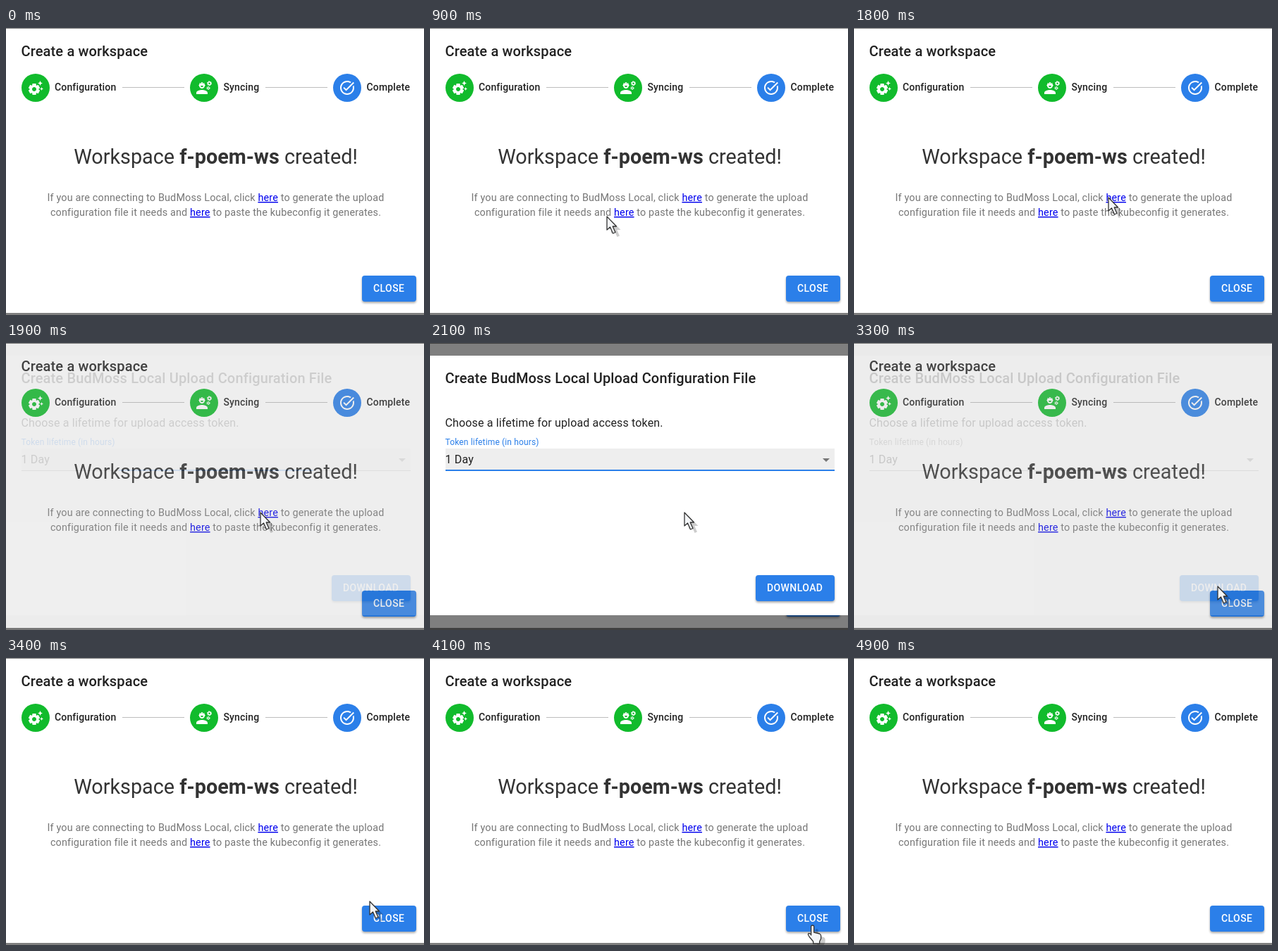
Animation, 593 px wide and 408 px high, one loop 6100 ms. Source, as an HTML page:

```html
<!DOCTYPE html>
<html lang="en">
<head>
<meta charset="utf-8">
<title>Create a workspace</title>
<style>
  html, body { margin: 0; width: 100%; height: 100%; overflow: hidden; background: #fff; }
  svg { display: block; width: 593px; height: 408px; }
  text { font: 400 14px Roboto, Arial, sans-serif; letter-spacing: .15px; fill: #212121; white-space: pre; }
  .title { font-size: 20px; font-weight: 500; }
  .step { font-weight: 500; }
  .headline { font-size: 28.8px; letter-spacing: 0; fill: #333; text-anchor: middle; }
  .headline tspan { font-weight: 700; }
  .note { font-size: 14.4px; fill: #777; text-anchor: middle; }
  .note tspan { fill: #00e; text-decoration: underline; }
  .body { font-size: 16px; }
  .label { font-size: 12px; }
  .button { fill: #2b7fe9; filter: drop-shadow(0 2px 1.5px #0005); }
  .caption { font-weight: 500; letter-spacing: .4px; fill: #fff; }
  .icon { fill: #fff; }
  .cog { fill: none; stroke: #fff; }
  .cursor { stroke: #333; stroke-width: 1.3; stroke-linejoin: round; fill: #f4f6f8; }
  .shadow { fill: #0003; stroke: none; }
</style>
</head>
<body>
<svg viewBox="0 0 593 408">
  <rect width="593" height="408" fill="#fff"/>
  <path d="M0 0H593V1H0ZM0 405H593V408H0Z" fill="#808080"/>

  <text class="title" x="21.5" y="40">Create a workspace</text>
  <path d="M165 84.5H253M368 84.5H456" stroke="#bdbdbd"/>
  <g fill="#11bb2c"><circle cx="42" cy="85" r="20"/><circle cx="281" cy="85" r="20"/></g>
  <circle cx="484" cy="85" r="20" fill="#2b7fe9"/>
  <text class="step" x="69" y="89">Configuration</text>
  <text class="step" x="308.5" y="89">Syncing</text>
  <text class="step" x="511.5" y="89">Complete</text>

  <path class="icon" transform="translate(30 73)" d="M17.41 6.59 15 5.5l2.41-1.09L18.5 2l1.09 2.41L22 5.5l-2.41 1.09L18.5 9zM21.28 12.72 20.5 11l-.78 1.72-1.72.78 1.72.78.78 1.72.78-1.72L23 13.5zM16.24 14.37l1.94 1.47-2.5 4.33-2.24-.94c-.2.13-.42.26-.64.37l-.3 2.4h-5l-.3-2.41c-.22-.11-.43-.23-.64-.37l-2.24.94-2.5-4.33 1.94-1.47v-.73l-1.94-1.47 2.5-4.33 2.24.94c.2-.13.42-.26.64-.37L7.5 6h5l.3 2.41c.22.11.43.23.64.37l2.24-.94 2.5 4.33-1.94 1.47zM13 14c0-1.66-1.34-3-3-3s-3 1.34-3 3 1.34 3 3 3 3-1.34 3-3z"/>
  <g transform="translate(269 73)">
    <path class="icon" d="M9 15c-2.67 0-8 1.34-8 4v2h16v-2c0-2.66-5.33-4-8-4zM4.74 9H5c0 2.21 1.79 4 4 4s4-1.79 4-4h.26a.5.5 0 0 0 0-1H13c0-1.48-.81-2.75-2-3.45v.95a.5.5 0 0 1-1 0V4.14a4 4 0 0 0-2 0V5.5a.5.5 0 0 1-1 0v-.95C5.81 5.25 5 6.52 5 8h-.26a.5.5 0 0 0 0 1zM11 9a2 2 0 0 1-4 0z"/>
    <g class="cog">
      <circle cx="19.5" cy="5.7" r="2" stroke-width="1.5"/>
      <circle cx="19.5" cy="5.7" r="3" stroke-width="1" stroke-dasharray="1.6 1.54"/>
      <circle cx="18" cy="12.4" r="1.4" stroke-width="1.1"/>
      <circle cx="18" cy="12.4" r="2.2" stroke-width=".8" stroke-dasharray="1.2 1.1"/>
    </g>
  </g>
  <path class="icon" transform="translate(472 73)" d="M22 5.18 10.59 16.6l-4.24-4.24 1.41-1.41 2.83 2.83 10-10zM19.79 10.22c.13.57.21 1.17.21 1.78 0 4.42-3.58 8-8 8s-8-3.58-8-8 3.58-8 8-8c1.58 0 3.04.46 4.28 1.25l1.44-1.44C16.1 2.67 14.13 2 12 2 6.48 2 2 6.48 2 12s4.48 10 10 10 10-4.48 10-10c0-1.19-.22-2.33-.6-3.39z"/>

  <text class="headline" x="297.5" y="193">Workspace <tspan>f-poem-ws</tspan> created!</text>
  <text class="note" x="297.5" y="246">If you are connecting to BudMoss Local, click <tspan>here</tspan> to generate the upload</text>
  <text class="note" x="297.5" y="267">configuration file it needs and <tspan>here</tspan> to paste the kubeconfig it generates.</text>
  <rect class="button" x="505" y="352" width="77" height="37" rx="4"/>
  <text class="caption" x="521" y="375">CLOSE</text>

  <rect id="backdrop" width="593" height="408" fill="#000"/>
  <g id="dialog">
    <rect y="18" width="593" height="369" fill="#fff"/>
    <text class="title" x="21.5" y="57">Create BudMoss Local Upload Configuration File</text>
    <text class="body" x="21.5" y="119">Choose a lifetime for upload access token.</text>
    <text class="label" id="label" x="21.5" y="145">Token lifetime (in hours)</text>
    <rect id="field" x="22" y="150" width="552" height="31" fill="#eee"/>
    <text class="body" x="21.5" y="171">1 Day</text>
    <path d="M557 164h10l-5 5z" fill="#757575"/>
    <path d="M22 181.5H574" stroke="#949494"/>
    <path id="underline" stroke="#2b7fe9" stroke-width="2"/>
    <rect class="button" x="462" y="330" width="112" height="37" rx="4"/>
    <text class="caption" x="478" y="353">DOWNLOAD</text>
  </g>

  <g id="cursor">
    <path id="shadow" class="shadow" transform="translate(6 5)"/>
    <path id="shape" class="cursor"/>
  </g>
</svg>
<script>
  const $ = id => document.getElementById(id);
  const LOOP = 6100, STEP = 100;
  const ARROW = "M0 0V19L4.5 15L8.5 24L12 22.5L8.2 14H13.5Z";
  const HAND = "M0 0q2 0 2 2v8l8 2q2 1 2 3v4l-2 4v3h-9v-3l-5-6q-3-4-2-5 1-1 3 0l1 2V2q0-2 2-2z";

  // time, x, y, shape from that time on
  const path = [
    [500, 420, 352, ARROW], [800, 251, 268, ARROW], [1100, 251, 268, ARROW],
    [1300, 365, 238, HAND], [1500, 365, 238, HAND], [1600, 364, 236, HAND],
    [1800, 361, 241, ARROW], [2300, 361, 241, ARROW], [2600, 515, 328, HAND],
    [3000, 515, 328, HAND], [3200, 516, 346, ARROW], [3800, 516, 346, ARROW],
    [4000, 540, 365, HAND], [4300, 548, 410, ARROW]
  ];

  const ease = (t, from, to) => {
    const p = Math.min(1, Math.max(0, (t - from) / (to - from)));
    return p * p * (3 - 2 * p);
  };

  function drawCursor(t) {
    const i = path.findIndex(key => key[0] > t);
    $("cursor").style.display = i > 0 ? "" : "none";
    if (i < 1) return;
    const [t0, x0, y0, shape] = path[i - 1], [t1, x1, y1] = path[i];
    const p = (t - t0) / (t1 - t0);
    $("cursor").setAttribute("transform", `translate(${x0 + (x1 - x0) * p} ${y0 + (y1 - y0) * p})`);
    $("shape").setAttribute("d", shape);
    $("shadow").setAttribute("d", shape);
  }

  function drawDialog(t) {
    const shown = ease(t, 1845, 2070) - ease(t, 3155, 3350);
    const focused = t < 3000;
    const half = focused ? 276 * ease(t, 1800, 2000) : 0;
    $("backdrop").setAttribute("opacity", shown / 2);
    $("dialog").setAttribute("opacity", shown);
    $("field").setAttribute("opacity", focused ? 1 : 0);
    $("label").style.fill = focused ? "#2b7fe9" : "#757575";
    $("underline").setAttribute("d", `M${298 - half} 181H${298 + half}`);
  }

  function frame() {
    const t = Math.floor(performance.now() % LOOP / STEP) * STEP;
    drawDialog(t);
    drawCursor(t);
    requestAnimationFrame(frame);
  }
  frame();
</script>
</body>
</html>
```
